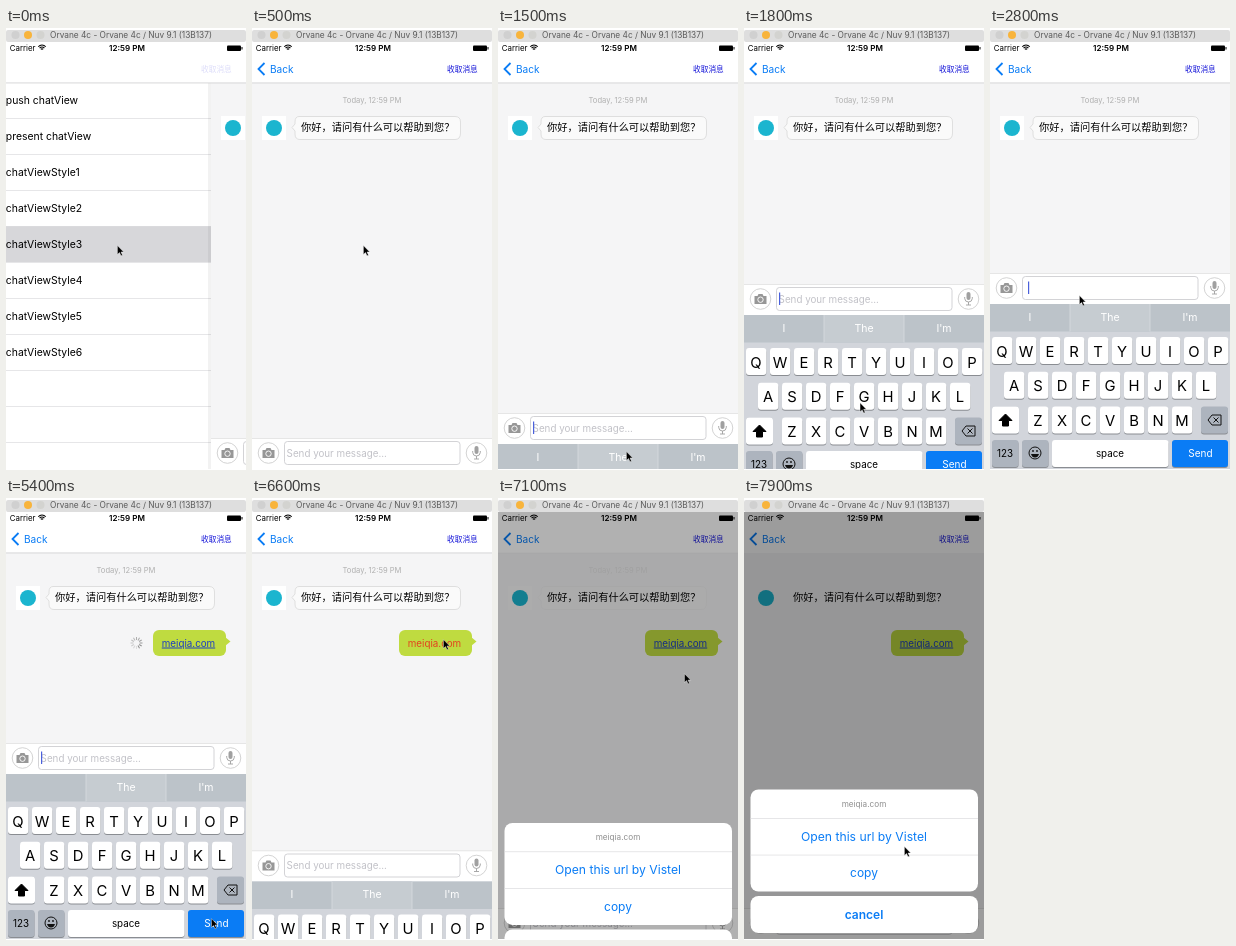
Write an HTML page that moves like this. It is 240 by 442 pixels and loops after 8 s.

```html
<!DOCTYPE html>
<html lang="en">
<head>
<meta charset="utf-8">
<title>Chat demo</title>
<style>
html, body { margin: 0; height: 100%; overflow: hidden; background: #fff; }
svg { display: block; width: 100vw; height: 100vh; font-family: Inter, "Noto Sans CJK SC", "Noto Sans CJK", sans-serif; }
</style>
</head>
<body>
<svg id="stage" viewBox="0 0 240 442"></svg>
<script>
const LOOP = 8000, KB = 165;
const BLUE = '#0a7cf5', LINE = '#dcdcde';

// Markup helpers
const rect = (x, y, w, h, fill, r = 0, more = '') =>
  `<rect x="${x}" y="${y}" width="${w}" height="${h}" rx="${r}" fill="${fill}" ${more}/>`;
const text = (x, y, s, size, fill = '#000', anchor = 'start', more = '') =>
  `<text x="${x}" y="${y + size * .36}" font-size="${size}" fill="${fill}" text-anchor="${anchor}" ${more}>${s}</text>`;
const mid = (x, y, s, size, fill, more) => text(x, y, s, size, fill, 'middle', more);
const circle = (x, y, r, fill, more = '') => `<circle cx="${x}" cy="${y}" r="${r}" fill="${fill}" ${more}/>`;
const path = (d, fill, more = '') => `<path d="${d}" fill="${fill}" ${more}/>`;
const group = (id, body, more = '') => `<g id="${id}" ${more}>${body}</g>`;
const stroke = (c, w = 1) => `stroke="${c}" stroke-width="${w}"`;

function titleBar() {
  return rect(0, 0, 240, 2, '#fff') + rect(0, 2, 240, 12, '#dedede', 2) +
    circle(9.5, 7, 4, '#d0d0d0') + circle(22, 7, 4, '#f8b43c') + circle(34.5, 7, 4, '#d3d3d0') +
    mid(125, 7, 'Orvane 4c - Orvane 4c / Nuv 9.1 (13B137)', 8.3, '#5a5a5a');
}

function list() {
  const names = ['push chatView', 'present chatView'];
  for (let i = 1; i < 7; i++) names.push('chatViewStyle' + i);
  let s = rect(0, 14, 240, 428, '#fff') + rect(0, 198, 240, 36, '#d7d7da');
  for (let i = 0; i < 11; i++) {
    s += rect(9.6, 90 + i * 36, 230, .7, LINE);
    if (names[i]) s += text(10.3, 72.5 + i * 36, names[i], 10.4);
  }
  return s;
}

function nav() {
  const wifi = [1.5, 3.2, 5].map(r =>
    path(`M${36 - r * .75} ${22.5 - r * .75}A${r} ${r} 0 0 1 ${36 + r * .75} ${22.5 - r * .75}`, 'none', stroke('#000', 1.1))).join('');
  return rect(0, 14, 240, 41, '#fff') + group('divider', rect(0, 54.6, 240, .7, '#c6c6c8')) +
    text(3.7, 20, 'Carrier', 7.9) + wifi + mid(121, 20, '12:59 PM', 8.1, '#000', 'font-weight="600"') +
    rect(221, 17.5, 14, 5.5, '#000', 1) + rect(235.5, 19, 1, 2.5, '#000') +
    group('back', path('M12.5 35L6.5 41L12.5 47', 'none', stroke(BLUE, 1.8)) + text(18, 41, 'Back', 10.1, BLUE)) +
    group('fetch', text(195, 41, '收取消息', 7.7, '#1414d8'));
}

function messages() {
  const faint = mid(120, 72, 'Today, 12:59 PM', 7.6, '#b0b0b0') + rect(10, 88, 24, 24, '#fff') +
    path('M47 88.5H203Q208.5 88.5 208.5 94V105Q208.5 111.5 203 111.5H48Q43 111.5 43 106V103L40 99.5L43 96V94Q43 88.5 47 88.5Z',
      '#fafafa', stroke('#d8d8d8', .8));
  let ticks = '';
  for (let i = 0; i < 12; i++)
    ticks += path('M0 -3V-6', 'none', `${stroke('#777', 1)} opacity="${.2 + i * .06}" transform="rotate(${i * 30})"`);
  return group('faint', faint) + circle(22, 100, 8, '#1bb5cf') +
    text(49, 99.5, '你好，请问有什么可以帮助到您？', 10.24) +
    group('sent', rect(147, 132, 73, 26, '#bfdb40', 6) + path('M219 139L224.5 143.5L219 148Z', '#bfdb40') +
      mid(182.5, 145, 'meiqia.com', 9.8, '#1c3fc0', 'id="link"')) +
    group('spinner', ticks);
}

function inputBar() {
  return rect(0, 410, 240, 32, '#fff') + rect(0, 410, 240, .7, '#dcdcdc') +
    rect(32.5, 413.5, 175.5, 23, '#fff', 3, stroke('#c8c8cc', .8)) +
    circle(16.5, 425, 10.3, '#fff', stroke('#c8c8c8', .8)) +
    path('M10.5 422H13.5L14.5 420H18.5L19.5 422H22.5V430H10.5Z', '#979797') +
    circle(16.5, 425.7, 2.7, '#979797', stroke('#fff', .9)) +
    circle(224.5, 425, 10.3, '#fff', stroke('#c8c8c8', .8)) +
    rect(222.5, 418, 4, 8, '#a0a0a0', 2) +
    path('M220.7 423V424.5Q221 428 224.5 428T228.3 424.5V423M224.5 428V431M222 431H227', 'none', stroke('#a0a0a0', .9)) +
    text(34.6, 425, 'Send your message...', 9.8, '#c2c2c8', 'start', 'id="hint"') +
    text(38, 425, 'meiqia.com', 9.8, '#000', 'start', 'id="typed"') +
    rect(0, 418.5, 1.2, 12.5, '#4a60dc', 0, 'id="caret"');
}

const key = (x, y, w, fill = '#fff') => rect(x, y + 1, w, 27, '#8a8d92', 3) + rect(x, y, w, 27, fill, 3);

// Drawn at rest just below the screen; lifted together with the input bar
function keyboard() {
  const rows = ['QWERTYUIOP', 'ASDFGHJKL', 'ZXCVBNM'], grey = '#adb4be';
  let s = rect(0, 441, 240, KB, '#d2d5db') + rect(0, 441, 240, 27.5, '#bcc3c9') + rect(80, 441, 80, 27.5, '#c6ccd1') +
    rect(79.6, 441, .8, 27.5, '#d8dce0') + rect(159.6, 441, .8, 27.5, '#d8dce0');
  let caps = '', small = '';
  for (let i = 0; i < 3; i++) s += mid(40 + i * 80, 454, '', 10.5, '#fff', `id="word${i}"`);
  rows.forEach((row, r) => [...row].forEach((c, i) => {
    const x = [12, 24, 48][r] + i * 24, y = 474 + r * 34.7;
    s += key(x - 10, y, 20.3);
    caps += mid(x, y + 14.2, c, 14.8);
    small += mid(x, y + 13, c.toLowerCase(), 15.5);
  }));
  const arrow = 'M15.5 551L22 557.5H18.5V563H12.5V557.5H9Z';
  s += key(2, 543.4, 27, grey) + key(211, 543.4, 27, grey) +
    path('M218 557L222 552H231V562H222Z', 'none', stroke('#111', 1)) +
    path('M223.5 554.5L228.5 559.5M228.5 554.5L223.5 559.5', 'none', stroke('#111', 1));
  caps += rect(2, 543.4, 27, 27, '#fff', 3) + path(arrow, '#000', stroke('#000'));
  small += path(arrow, 'none', stroke('#111', 1));
  s += key(2, 577, 26.5, grey) + mid(15, 590.5, '123', 9.8) + key(32, 577, 26.5, grey) +
    circle(45, 590, 6, 'none', stroke('#111', 1)) + circle(43, 588, .9, '#111') + circle(47, 588, .9, '#111') +
    path('M41 591H49Q48 594.5 45 594.5T41 591Z', '#111') +
    key(62, 577, 116.5) + mid(120, 590, 'space', 9.8) +
    key(182, 577, 56, BLUE) + mid(210.5, 590, 'Send', 10, '#fff');
  return s + group('caps', caps) + group('small', small);
}

function menu() {
  return path('M12 218.5H155Q160.5 218.5 160.5 224V236Q160.5 241.5 155 241.5H43L38 247L33 241.5H12Q6.5 241.5 6.5 236V224Q6.5 218.5 12 218.5Z', '#1c1c1c') +
    path('M115 218.5H155Q160.5 218.5 160.5 224V236Q160.5 241.5 155 241.5H115Z', '#8a8a8a', 'id="paste"') +
    rect(54.7, 218.5, .7, 23, '#888') + rect(114.7, 218.5, .7, 23, '#888') +
    mid(31, 230, 'Select', 8.8, '#fff') + mid(85, 230, 'Select All', 8.8, '#fff') + mid(138, 230, 'Paste', 8.8, '#fff');
}

function sheet() {
  return rect(6.5, 291.5, 227.5, 102, '#fff', 8) + rect(6.5, 398, 227.5, 37, '#fff', 8) +
    rect(6.5, 320, 227.5, .7, LINE) + rect(6.5, 356.7, 227.5, .7, LINE) +
    mid(120, 306, 'meiqia.com', 8.2, '#8f8f8f') + mid(120, 338.5, 'Open this url by Vistel', 12.2, BLUE) +
    mid(120, 375, 'copy', 12, BLUE) + mid(120, 416.5, 'cancel', 12, BLUE, 'font-weight="600"');
}

const stage = document.getElementById('stage');
stage.innerHTML = '<clipPath id="screen"><rect y="14" width="240" height="427"/></clipPath>' +
  `<g clip-path="url(#screen)">${group('list', list())}` +
  group('chat', rect(-3, 55, 3, 387, '#000', 0, 'opacity=".05"') + rect(0, 14, 240, 428, '#f5f5f6') +
    messages() + group('lift', inputBar() + keyboard())) +
  group('nav', nav()) + group('menu', menu()) + rect(0, 14, 240, 428, '#000', 0, 'id="dim"') +
  group('sheet', sheet()) + '</g>' + titleBar() +
  group('pointer', path('M.4 .6V9.5L2.5 7.5L4 10.800L5.500 10.200L4 7H6.700Z', '#000', stroke('#fff', .4)));

const el = {};
stage.querySelectorAll('[id]').forEach(e => el[e.id] = e);

// Linear interpolation over [time, value] points
function at(t, points) {
  let [t0, v0] = points[0];
  for (const [t1, v1] of points) {
    if (t < t1) return t <= t0 ? v0 : v0 + (v1 - v0) * (t - t0) / (t1 - t0);
    t0 = t1; v0 = v1;
  }
  return v0;
}
const ease = p => p * p * (3 - 2 * p);
const move = (e, x, y) => e.setAttribute('transform', `translate(${x} ${y})`);
const show = (e, on) => e.setAttribute('opacity', +on);

// Pointer travels: start, end, target x, target y
const trips = [[700, 1100, 128, 423], [1500, 2300, 89, 269], [2300, 2500, 89, 267], [3000, 3700, 130, 238],
  [4300, 5000, 205, 420], [5400, 6200, 191, 141], [6900, 7600, 166, 313], [7700, 7900, 160, 348]];

function pointer(t) {
  let x = 111, y = 217;
  for (const [a, b, tx, ty] of trips) {
    const p = ease(Math.min(1, Math.max(0, (t - a) / (b - a))));
    x += (tx - x) * p;
    y += (ty - y) * p;
  }
  return [x, y];
}

function words(t) {
  if (t < 4100 || t >= 5500) return ['I', 'The', "I'm"];
  if (t < 4200) return ['"c', 'Th', "I'"];
  return t < 5300 ? ['', '', ''] : ['', 'The', "I'm"];
}

function draw(t) {
  const x = at(t, [[0, 205], [100, 130], [200, 62], [300, 22], [400, 6], [500, 0]]), pushed = 1 - x / 240;
  move(el.chat, x, 0);
  move(el.list, -72 * pushed, 0);
  move(el.back, x * .3, 0);
  show(el.back, Math.max(0, pushed * 1.17 - .17));
  show(el.fetch, pushed);

  const lift = at(t, [[1400, 0], [1500, 25], [1600, 88], [1700, 133], [1800, 154], [1900, 162], [2000, KB],
    [6300, KB], [6400, 152], [6500, 108], [6600, 57.5], [6700, 22], [6800, 6], [6900, 0]]);
  move(el.lift, 0, -lift);

  const typed = t >= 4200 && t < 5200, blank = t >= 2700 && t < 4200;
  const lower = t >= 4100 && t < 5200;
  show(el.typed, typed);
  show(el.hint, !typed && !blank);
  show(el.caret, t >= 1400 && t < 6400);
  el.caret.setAttribute('x', typed ? 92 : blank ? 38 : 35);
  show(el.caps, !lower);
  show(el.small, lower);
  words(t).forEach((w, i) => {
    el['word' + i].textContent = w;
    show(el['word' + i], t >= 4100 && t < 4200 ? .6 : 1);
  });

  show(el.menu, at(t, [[2800, 0], [3000, 1], [4000, 1], [4100, .55], [4200, .15], [4300, 0]]));
  show(el.paste, t >= 3900);

  const pressed = t >= 6400 && t < 6800;
  show(el.sent, t >= 5200);
  el.link.setAttribute('fill', pressed ? '#e2431e' : '#1c3fc0');
  el.link.setAttribute('text-decoration', pressed ? 'none' : 'underline');
  show(el.spinner, t >= 5200 && t < 5800);
  el.spinner.setAttribute('transform', `translate(130.5 145) rotate(${t * .3})`);

  const up = at(t, [[6800, 0], [6900, .15], [7000, .5], [7100, .78], [7200, .92], [7300, .98], [7400, 1]]);
  show(el.dim, up * .39);
  show(el.faint, 1 - up);
  show(el.divider, 1 - up);
  move(el.sheet, 0, 152 * (1 - up));
  move(el.pointer, ...pointer(t));
}

function tick(now) {
  draw(Math.floor(now % LOOP / 100) * 100);
  requestAnimationFrame(tick);
}
draw(0);
requestAnimationFrame(tick);
</script>
</body>
</html>
```
